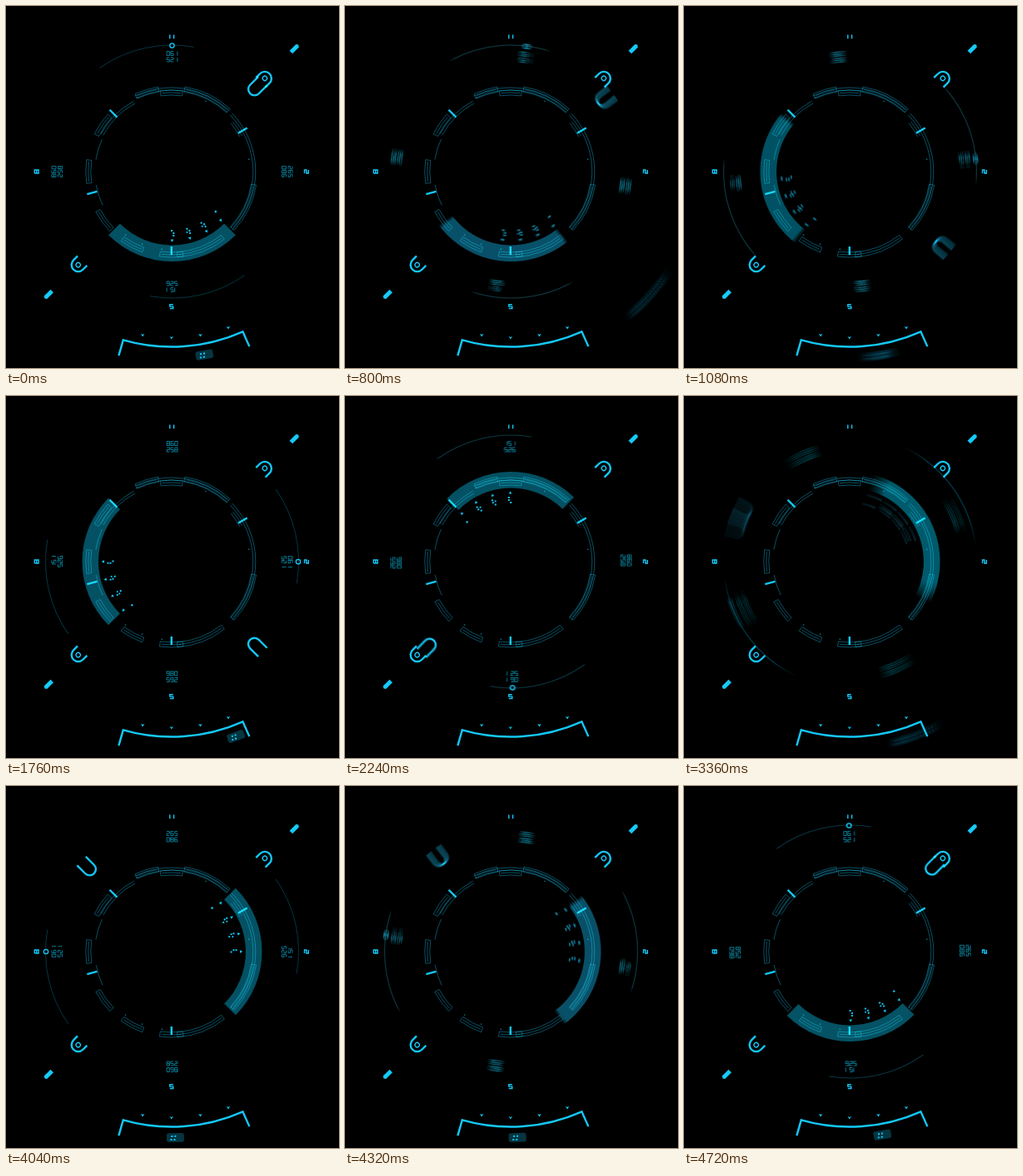
Recreate the animation shown at these times as an HTML page with a canvas. Size 400 by 435 pixels, loop 4760 ms.

```html
<!DOCTYPE html>
<html lang="en">
<head>
<meta charset="utf-8">
<title>HUD dial</title>
<style>
  html, body { margin: 0; height: 100%; overflow: hidden; background: #000; }
  canvas { display: block; }
</style>
</head>
<body>
<canvas id="stage" width="400" height="435"></canvas>
<script>
const ctx = document.getElementById('stage').getContext('2d');
const LOOP = 4760, FRAME = 40, SHUTTER = 36;
const BRIGHT = '#14c8f8', MID = '#08778f', DIM = '#084e61', FAINT = '#053540', BAND = '#045164';
const RAD = Math.PI / 180;

// Four moves, evenly started; each turns the dial by a quarter
const FIRST_MOVE = 555, MOVE_GAP = 1168;
const DURATIONS = [670, 550, 720, 700];
const TAG_TURNS = [-370, -90, 109, -9];

// Cubic Bezier ease (.88, 0, .3, 1)
function ease(x) {
  if (x <= 0) return 0;
  if (x >= 1) return 1;
  let lo = 0, hi = 1;
  for (let i = 0; i < 22; i++) {
    const s = (lo + hi) / 2, q = 1 - s;
    if (2.64 * s * q * q + 0.9 * s * s * q + s * s * s < x) lo = s; else hi = s;
  }
  return lo * lo * (3 - 2 * lo);
}
const progress = t => DURATIONS.map((d, i) => ease((t - FIRST_MOVE - MOVE_GAP * i) / d));
const dialAngle = t => progress(t).reduce((a, p) => a + 90 * p, 0);
// The tag runs a little ahead of the dial
const tagAngle = t => progress(t).reduce((a, p, i) => a + TAG_TURNS[i] * (1 - (1 - p) ** 1.3), 170);

// Angles are clockwise degrees from the top of the dial
const polar = (r, a) => [r * Math.sin(a * RAD), -r * Math.cos(a * RAD)];
const arc = (r, from, to, back) => ctx.arc(0, 0, r, (from - 90) * RAD, (to - 90) * RAD, back);

function stroke(color, width, path) {
  ctx.beginPath();
  path();
  ctx.strokeStyle = color;
  ctx.lineWidth = width;
  ctx.stroke();
}
function ringSlice(r1, r2, from, to) {
  arc(r2, from, to);
  arc(r1, to, from, true);
  ctx.closePath();
}
function line(...points) {
  points.forEach(([x, y], i) => i ? ctx.lineTo(x, y) : ctx.moveTo(x, y));
}
function fillPoly(color, ...points) {
  ctx.beginPath();
  line(...points);
  ctx.fillStyle = color;
  ctx.fill();
}
function dot(x, y, size, color) {
  ctx.fillStyle = color;
  ctx.fillRect(x - size / 2, y - size / 2, size, size);
}
// Local frame at a polar place; y points inward
function at(r, a, draw) {
  ctx.save();
  ctx.rotate(a * RAD);
  ctx.translate(0, -r);
  draw();
  ctx.restore();
}

// Each digit is a pen path over a grid of points, two wide and three high
const PEN = ['01540', '15', '013245', '0132354', '02315', '102354', '104532', '015', '0154023', '320154'];
function digits(text, left, top, w = 3.2, h = 2.5) {
  [...text].forEach((d, i) =>
    line(...[...PEN[d]].map(p => [left + i * 4.8 + p % 2 * w, top + (p >> 1) * h])));
}

// U shape with its round end up (or down) and straight legs
function arch(r, leg) {
  stroke(BRIGHT, 2.4, () => {
    ctx.moveTo(-r, leg);
    ctx.lineTo(-r, 0);
    ctx.arc(0, 0, r, Math.PI, 0, leg < 0);
    ctx.lineTo(r, leg);
  });
}
const ring = () => stroke(BRIGHT, 1.3, () => ctx.arc(0, 0, 2.7, 0, 7));

function drawDial() {
  ctx.beginPath();
  ringSlice(88.5, 108, 135, 225);
  ctx.fillStyle = BAND;
  ctx.fill();

  for (const a of [-35, 145]) stroke(FAINT, 1, () => arc(152, a, a + 45));
  at(151.5, 0, ring);
  at(140, 45, () => arch(7.4, -14));

  ['061521', '265086', '151526', '860258'].forEach((text, i) => at(138, i * 90, () =>
    stroke(MID, 1, () => {
      digits(text.slice(0, 3), -6.4, -6.5);
      digits(text.slice(3), -6.4, 1);
    })));

  // Columns of dots ending in a small pointer
  for (let i = 0; i < 4; i++) at(83, 180 - 15 * i, () => {
    fillPoly(BRIGHT, [-1.8, 1.5], [1.8, 1.5], [0, -1.8]);
    if (i === 3) return dot(-3, 12, 2.2, BRIGHT);
    for (let y = 6; y <= 12; y += 3) dot(y > 10 ? 0.5 : -1.8, y, 2, BRIGHT);
    if (i) dot(1.5, 8, 1.8, BRIGHT);
  });
}

function drawTag() {
  at(223.5, 0, () => {
    ctx.rotate(Math.PI);
    ctx.beginPath();
    ctx.roundRect(-10.5, -5.3, 21, 10.6, 2.5);
    ctx.fillStyle = FAINT;
    ctx.fill();
    for (let i = 0; i < 4; i++) dot(-5 + i % 2 * 4 + (i < 2), i < 2 ? -1.6 : 2.5, 2, BRIGHT);
  });
}

// Averages the exposures of a moving part over the time just before t
function blurred(angleAt, t, draw) {
  const spread = Math.abs(angleAt(t) - angleAt(t - SHUTTER));
  const n = Math.max(1, Math.min(18, Math.ceil(spread * 2.5)));
  ctx.save();
  if (n > 1) ctx.globalCompositeOperation = 'lighter';
  ctx.globalAlpha = 1 / n;
  for (let i = 0; i < n; i++) {
    ctx.save();
    ctx.rotate(angleAt(t - SHUTTER * (i + 0.5) / n) * RAD);
    draw();
    ctx.restore();
  }
  ctx.restore();
}

function drawRing() {
  // Outlined brackets, long ones on the right; those on the vertical axis sit lower
  for (const mid of [-56, -17, 0, 26, 116, 159, 180, 208, 234, 270]) {
    const half = mid > 20 && mid < 165 ? 17 : 8;
    const inner = mid === 0 ? 92 : 97, outer = inner + 6;
    stroke(DIM, 1, () => ringSlice(inner, outer, mid - half, mid + half));
    stroke(DIM, 1, () => arc(inner + 3, mid - half + 1, mid + half - 1));
  }
  for (const gap of [0, 3]) {
    stroke(DIM, 1, () => arc(98 + gap, -26, 43));
    stroke(DIM, 1, () => arc(98 + gap, 46, 134));
    stroke(DIM, 1, () => arc(93 + gap, -62, -28));
    stroke(DIM, 1, () => arc(92 + gap, 51, 63));
  }
  for (const a of [-81, 244]) stroke(DIM, 1, () => arc(92, a, a + 16));
  for (const a of [26, 81, 187, 202, 216]) dot(...polar(94, a), 1.4, MID);
  for (const a of [-45, 60, 180, 255]) {
    const r = a === 180 ? 90 : 92.5;
    stroke(BRIGHT, 2.4, () => line(polar(r, a), polar(2 * r - 80, a)));
  }
}

function drawFixed() {
  drawRing();

  for (const a of [45, 225]) {
    at(158.5, a, () => { arch(8, 7); ring(); });
    at(209, a, () => {
      fillPoly(BRIGHT, [-2.5, -5], [0, -6.5], [2.5, -5], [2.5, 6], [-2.5, 6]);
      for (const y of [-2, 1]) stroke('#0a8fb0', 0.6, () => line([-1.2, y], [1.2, y]));
    });
  }
  ['11', '2', '5', '8'].forEach((text, i) => at(162, i * 90, () =>
    stroke(BRIGHT, 1.4, () => digits(text, i ? -2 : -6, -2.5, 4, 2.4))));

  // Scale below the dial
  stroke(BRIGHT, 2.4, () => {
    ctx.moveTo(...polar(230, 196));
    arc(210.5, 196, 156, true);
    ctx.lineTo(...polar(230, 156));
  });
  for (let a = 160; a <= 190; a += 10) {
    const [x, y] = polar(199.5, a);
    fillPoly(BRIGHT, [x - 2.2, y - 1.5], [x, y - 0.6], [x + 2.2, y - 1.5], [x, y + 2]);
  }
}

function render(now) {
  const t = Math.floor(now % LOOP / FRAME) * FRAME;
  ctx.setTransform(1, 0, 0, 1, 0, 0);
  ctx.globalCompositeOperation = 'source-over';
  ctx.fillStyle = '#000';
  ctx.fillRect(0, 0, 400, 435);
  ctx.translate(199.5, 199);
  blurred(dialAngle, t, drawDial);
  blurred(tagAngle, t, drawTag);
  ctx.translate(-0.7, 0);
  ctx.globalCompositeOperation = 'screen';
  drawFixed();
}

const begin = performance.now();
function tick() {
  render(performance.now() - begin);
  requestAnimationFrame(tick);
}
tick();
</script>
</body>
</html>
```
